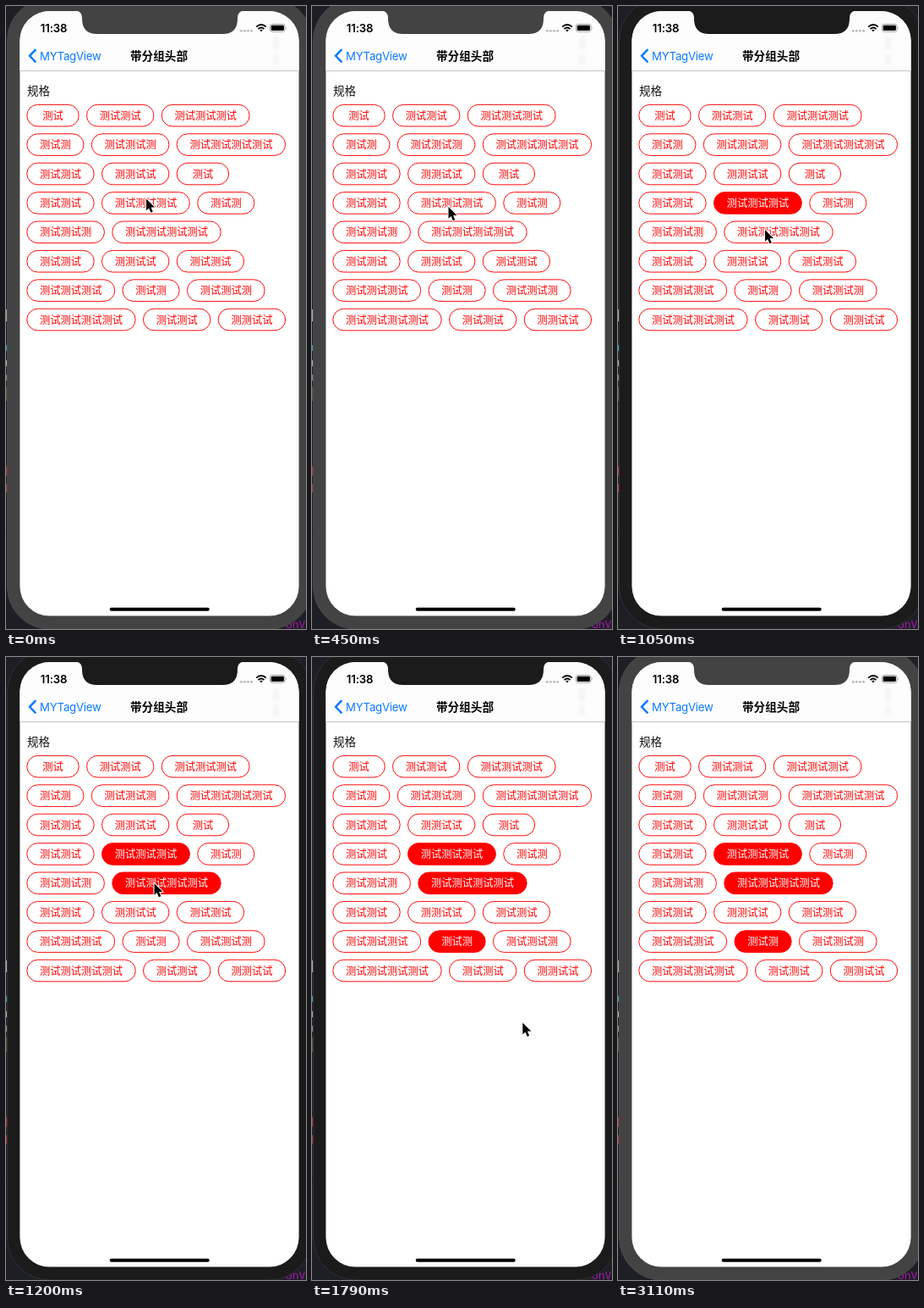
An HTML page for the animation above (3.21 s loop, 355 by 735 pixels).

```html
<!DOCTYPE html>
<html lang="zh-CN">
<head>
<meta charset="utf-8">
<title>带分组头部</title>
<style>
  html, body { margin: 0; width: 100%; height: 100%; overflow: hidden; background: #1e1e25; }
  svg { display: block; width: 355px; height: 735px; }
  text { font-family: "Noto Sans CJK SC", "Noto Sans CJK", sans-serif; }
  .latin { font-family: Inter, Roboto, sans-serif; }
  .code { font-family: "Noto Sans Mono", monospace; }
  .tag rect { fill: #fff; stroke: #f00; stroke-width: .95; }
  .tag text { fill: #f00; font-size: 12.25px; text-anchor: middle; }
  .tag.on rect { fill: #f00; }
  .tag.on text { fill: #fff; }
</style>
</head>
<body>
<svg viewBox="0 0 355 735">
  <defs>
    <clipPath id="screen"><rect x="16.4" y="6" width="330.2" height="713.6" rx="35"/></clipPath>
    <filter id="soft" x="-100%" y="-50%" width="300%" height="200%"><feGaussianBlur stdDeviation="2"/></filter>
  </defs>

  <rect width="355" height="735" fill="#1e1e25"/>
  <g id="editor"></g>
  <text class="code" x="331" y="734" font-size="13" fill="#a81bb0">onV</text>
  <rect id="bezel" x="1.5" y="-9" width="360.5" height="744" rx="50"/>

  <g clip-path="url(#screen)">
    <rect x="16" y="6" width="331" height="714" fill="#fff"/>
    <rect x="16" y="6" width="331" height="70" fill="#fdfdfd"/>
    <rect x="16" y="76" width="331" height="1" fill="#c4c4c4"/>
    <g fill="#000" opacity=".035" filter="url(#soft)">
      <rect x="316" y="36" width="7" height="16" rx="3"/>
      <rect x="316" y="57" width="7" height="13" rx="3"/>
    </g>
    <path id="notch" d="M81 5Q90 6 90 14V15Q90 33 108 33H256Q274 33 274 15V14Q274 6 283 5Z"/>
  </g>

  <text class="latin" x="40.7" y="30.7" font-size="13.2" font-weight="600" letter-spacing="-.1">11:38</text>
  <g id="dots" fill="#bdbdbd"></g>
  <g fill="none" stroke="#000" stroke-width="1.9">
    <path d="M296.2 24.6Q302 19.6 307.8 24.6"/>
    <path d="M298.5 27.1Q302 24.1 305.5 27.1"/>
    <path d="M300.2 28.3Q302 27 303.8 28.3L302 30.4Z" fill="#000" stroke="none"/>
  </g>
  <rect x="312.5" y="21.5" width="17.6" height="8.8" rx="2.3" fill="none" stroke="#999" stroke-width=".9"/>
  <rect x="313.7" y="22.7" width="15.2" height="6.4" rx="1.3"/>
  <path d="M331 24.2Q332.4 25.9 331 27.6Z" fill="#999"/>

  <path d="M35.3 51.2L28 58.8L35.3 66.4" fill="none" stroke="#0a7aff" stroke-width="2.4"/>
  <text class="latin" x="40" y="63.5" font-size="13.2" letter-spacing="-.25" fill="#0a7aff">MYTagView</text>
  <text x="181" y="63.6" font-size="13.6" font-weight="600" text-anchor="middle">带分组头部</text>
  <text x="25" y="105" font-size="13.5" fill="#111">规格</text>
  <g id="tags"></g>
  <rect x="122.7" y="709.8" width="118" height="3.9" rx="1.95"/>
  <path id="cursor" d="M0 0V13.8L3.1 10.9L5.4 16.2L7.8 15.2L5.6 10H10Z" stroke="#fff" stroke-width="2" stroke-linejoin="round" paint-order="stroke"/>
</svg>

<script>
const LOOP = 3210;
const $ = id => document.getElementById(id);

function add(parent, name, attrs, content = '') {
  const node = document.createElementNS('http://www.w3.org/2000/svg', name);
  for (const key in attrs) node.setAttribute(key, attrs[key]);
  node.textContent = content;
  parent.append(node);
  return node;
}

// Slivers of the editor window visible beside the phone
[[358, 14, '#aaa'], [400, 7, '#28a0b8'], [418, 7, '#aaa'], [435, 7, '#888'],
 [449, 17, '#4d5b3c'], [543, 11, '#b83232'], [564, 10, '#b83232'], [619, 1, '#000']]
  .forEach(([y, height, fill]) => add($('editor'), 'rect', { x: 0, y, width: 1.4, height, fill }));

for (let i = 0; i < 4; i++) add($('dots'), 'circle', { cx: 278.3 + i * 4.1, cy: 29.2, r: 1.5 });

const rows = [
  ['测试', '测试测试', '测试测试测试'],
  ['测试测', '测试测试测', '测试测试测试测试'],
  ['测试测试', '测测试试', '测试'],
  ['测试测试', '测试测试测试', '测试测'],
  ['测试测试测', '测试测试测试测试'],
  ['测试测试', '测测试试', '测试测试'],
  ['测试测试测试', '测试测', '测试测试测'],
  ['测试测试测试测试', '测试测试', '测测试试']
];

// Left-to-right flow: width follows the label, with a minimum
const tags = rows.map((labels, row) => {
  let x = 24.5;
  const cy = 129.2 + row * 34.4;
  return labels.map(label => {
    const width = Math.max(62, label.length * 12.25 + 31);
    const tag = add($('tags'), 'g', { class: 'tag' });
    add(tag, 'rect', { x: x + .3, y: cy - 12.8, width: width - .6, height: 25.6, rx: 12.8 });
    add(tag, 'text', { x: x + width / 2, y: cy + 4.5 }, label);
    x += width + 8.7;
    return tag;
  });
});

// Time and pointer tip; no tip hides the pointer
const pointer = [
  [0, 166, 227.5], [300, 164, 228.5], [450, 161.5, 237], [750, 160.5, 236.3],
  [1050, 174, 264], [1200, 175.5, 267], [1340, 183.5, 325.5],
  [1490, 183.5, 332.5], [1790, 249.3, 431.5], [1940]
];

const selections = [
  { tag: tags[3][1], at: 750 },
  { tag: tags[4][1], at: 1200 },
  { tag: tags[6][1], at: 1790 }
];

function draw(t) {
  const active = t >= 750 && t < 3110;
  const shell = active ? '#1b1b1b' : '#434343';
  $('bezel').setAttribute('fill', shell);
  $('bezel').setAttribute('stroke', active ? '#323236' : '#4a4a4a');
  $('notch').setAttribute('fill', shell);
  selections.forEach(({ tag, at }) => tag.classList.toggle('on', t >= at));

  const [, x, y] = pointer.filter(step => step[0] <= t).pop();
  $('cursor').setAttribute('visibility', x === undefined ? 'hidden' : 'visible');
  if (x !== undefined) $('cursor').setAttribute('transform', `translate(${x} ${y})`);
}

const start = performance.now();
function tick() {
  draw((performance.now() - start) % LOOP);
  requestAnimationFrame(tick);
}
tick();
</script>
</body>
</html>
```
